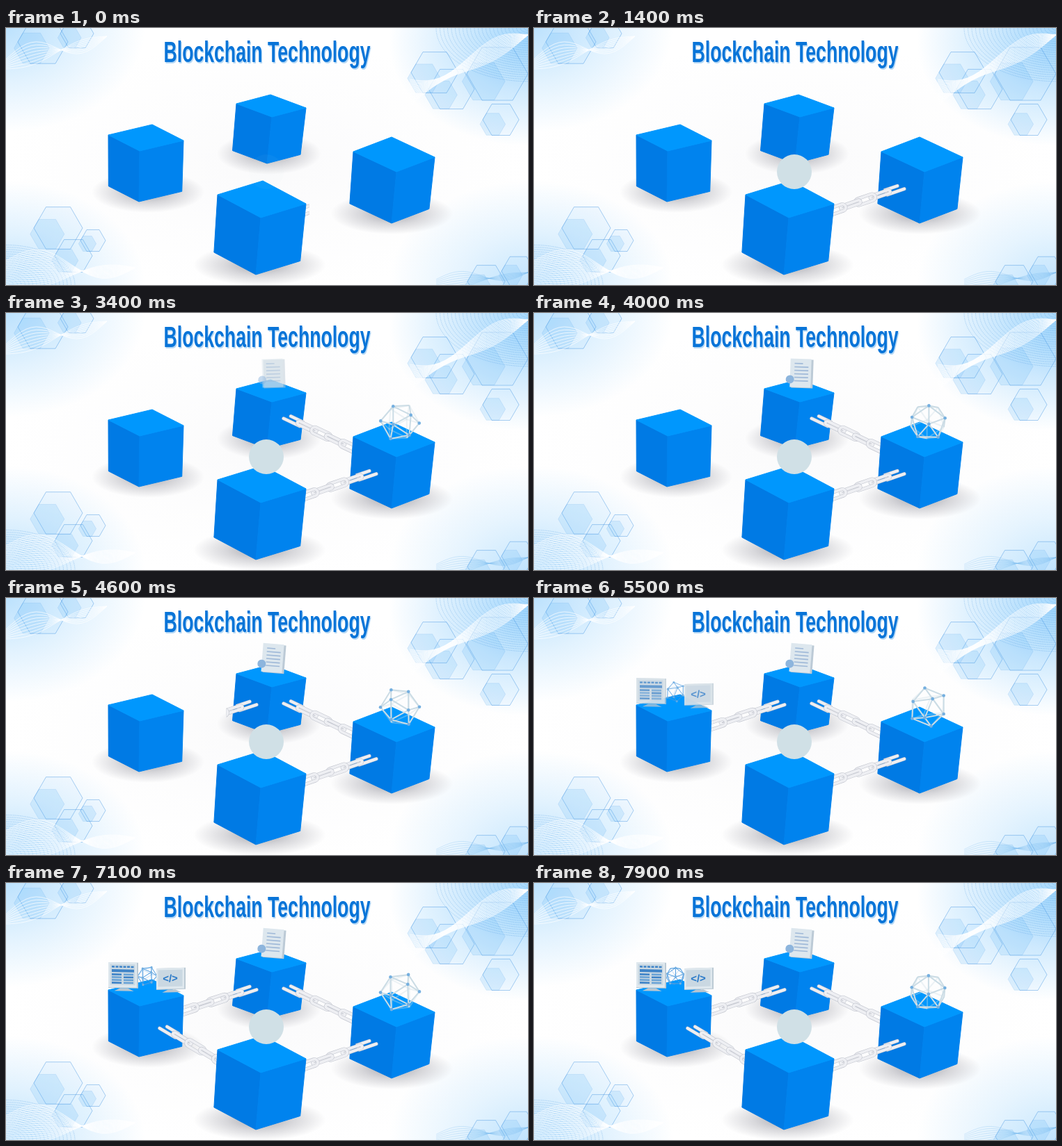
Recreate the animation shown at these times as an HTML page with a canvas. Size 750 px wide and 370 px high, loop 8 s.

```html
<!DOCTYPE html>
<html lang="en">
<head>
<meta charset="utf-8">
<title>Blockchain Technology</title>
<style>
html, body { margin: 0; width: 100%; height: 100%; overflow: hidden; background: #fff; }
canvas { display: block; }
</style>
</head>
<body>
<canvas id="stage" width="750" height="370"></canvas>
<script>
const W = 750, H = 370, LOOP = 8000, STEP = 100, TAU = Math.PI * 2;
const SANS = '"Liberation Sans", Arial, sans-serif';
const ctx = document.getElementById('stage').getContext('2d');
const backdrop = document.createElement('canvas');
backdrop.width = W;
backdrop.height = H;

const ramp = (t, start, length) => Math.min(1, Math.max(0, (t - start) / length));
const mix = (a, b, k) => a + (b - a) * k;
const add = (...points) => points.reduce(([ax, ay], [bx, by]) => [ax + bx, ay + by]);

function poly(c, points, fill, stroke, width = 1) {
  c.beginPath();
  points.forEach(p => c.lineTo(...p));
  c.closePath();
  if (fill) { c.fillStyle = fill; c.fill(); }
  if (stroke) { c.strokeStyle = stroke; c.lineWidth = width; c.stroke(); }
}

function disc(c, x, y, r, fill) {
  c.beginPath();
  c.arc(x, y, r, 0, TAU);
  c.fillStyle = fill;
  c.fill();
}

function glow(c, x, y, rx, ry, rgb, alpha) {
  c.save();
  c.translate(x, y);
  c.scale(rx, ry);
  const g = c.createRadialGradient(0, 0, 0, 0, 0, 1);
  g.addColorStop(0, `rgba(${rgb},${alpha})`);
  g.addColorStop(.5, `rgba(${rgb},${alpha * .45})`);
  g.addColorStop(1, `rgba(${rgb},0)`);
  c.fillStyle = g;
  c.fillRect(-1, -1, 2, 2);
  c.restore();
}

function hexagon(c, x, y, r, fillAlpha, lineAlpha) {
  const points = Array.from({ length: 6 }, (_, i) =>
    [x + r * Math.cos(i * TAU / 6), y + r * Math.sin(i * TAU / 6)]);
  poly(c, points, `rgba(105,185,245,${fillAlpha})`, `rgba(70,150,225,${lineAlpha})`);
}

// An outlined hexagon with a smaller tinted one overlapping its corner
function hexPair(c, x, y, r) {
  hexagon(c, x, y, r, .06, .45);
  hexagon(c, x - r * .45, y + r * .25, r * .7, .2, .15);
}

// Sine strands between two points that fan out in the middle
function wave(c, [x0, y0], [x1, y1], swing, count, color) {
  c.strokeStyle = color;
  c.lineWidth = .8;
  for (let i = 0; i < count; i++) {
    c.beginPath();
    for (let u = 0; u <= 1.01; u += .05) {
      c.lineTo(mix(x0, x1, u), mix(y0, y1, u) + i * 2 * (1 - u)
        + swing * Math.sin(u * TAU) * (1 - i / count * 1.6));
    }
    c.stroke();
  }
}

function ripples(c, x, y, count) {
  c.strokeStyle = 'rgba(65,145,220,.4)';
  c.lineWidth = .8;
  c.setLineDash([1.5, 1]);
  for (let i = 1; i <= count; i++) {
    c.beginPath();
    c.ellipse(x, y, i * 5.5, i * 3.2, 0, 0, TAU);
    c.stroke();
  }
  c.setLineDash([]);
}

function drawTitle(c) {
  c.save();
  c.translate(375, 48.5);
  c.scale(.634, 1);
  c.font = 'bold 42px ' + SANS;
  c.textAlign = 'center';
  c.fillStyle = '#b5d8f5';
  c.fillText('Blockchain Technology', 2, 2);
  c.fillStyle = '#0874d8';
  c.fillText('Blockchain Technology', 0, 0);
  c.restore();
}

// Each cube: front corner of its top, and the edges leaving that corner
const cubes = {
  left: { front: [192, 177], left: [-45, -23], right: [63, -15], down: [-1, 73] },
  back: { front: [382, 128], left: [-51, -19], right: [49, -13], down: [-7, 67] },
  right: { front: [561, 207], left: [-62, -29], right: [55, -21], down: [-7, 74] },
  front: { front: [366, 273], left: [-62, -33], right: [65, -20], down: [-7, 82] }
};

function drawShadow(c, { front, left, right, down }) {
  const [x, y] = add(front, down);
  const half = (right[0] - left[0]) / 2;
  glow(c, x + (left[0] + right[0]) / 2 + 4, y - 14, half * 1.5, 30, '80,80,95', .5);
}

function drawCube({ front, left, right, down }) {
  const l = add(front, left), r = add(front, right), low = add(front, down);
  // Lower edges are a little shorter: perspective
  const lowLeft = add(low, left.map(v => v * .97)), lowRight = add(low, right.map(v => v * .98));
  poly(ctx, [front, l, lowLeft, low], '#007ae4', '#007ae4');
  poly(ctx, [front, r, lowRight, low], '#0083ee', '#0083ee');
  poly(ctx, [front, l, add(l, right), r], '#0097fd', '#0097fd');
}

function drawBackdrop(c) {
  c.fillStyle = '#fff';
  c.fillRect(0, 0, W, H);
  glow(c, W / 2, 200, 380, 180, '246,246,248', .5);
  for (const [x, y, alpha] of [[0, 0, .42], [W, 20, .6], [0, H, .42], [W, H, .35]]) {
    glow(c, x, y, 200, 150, '95,185,250', alpha);
  }

  [[53, 20, 36], [102, 8, 24], [640, 88, 33], [616, 64, 34], [706, 66, 44],
   [711, 132, 26], [75, 288, 35], [97, 328, 27], [125, 306, 18],
   [690, 365, 27], [736, 350, 24]].forEach(h => hexPair(c, ...h));

  ripples(c, 0, H, 18);
  ripples(c, W, 0, 24);
  const white = 'rgba(255,255,255,.9)';
  wave(c, [0, 45], [145, 12], -16, 8, white);
  wave(c, [580, 74], [W, 10], 14, 20, white);
  wave(c, [0, 335], [186, 345], -18, 18, white);
  wave(c, [618, 362], [W, 352], -9, 8, 'rgba(100,175,235,.3)');

  Object.values(cubes).forEach(cube => drawShadow(c, cube));
  drawTitle(c);
}

// Links run from open prongs at one cube to the next cube; only lo..hi shows
function drawChain([x1, y1], [x2, y2], lo, hi) {
  if (hi <= lo) return;
  const up = x2 > x1 ? -1 : 1, gap = 3.7;
  ctx.save();
  ctx.beginPath();
  ctx.rect(lo, 0, hi - lo, H);
  ctx.clip();
  ctx.translate(x1, y1);
  ctx.rotate(Math.atan2(y2 - y1, x2 - x1));
  ctx.translate(0, up * gap);
  ctx.lineCap = 'round';
  for (let i = 0; i < 5; i++) {
    const x = i * 22.5, half = i % 2 ? 2.6 : 4.8;
    for (const [color, width] of [['#c3c6cf', 5], ['#eeeff3', 3.8]]) {
      ctx.beginPath();
      if (i) {
        ctx.roundRect(x, -half, 30, half * 2, half);
      } else {
        ctx.moveTo(2, -up * gap);
        ctx.lineTo(28, -up * gap);
        ctx.moveTo(10, up * gap);
        ctx.lineTo(28, up * gap);
        ctx.lineTo(28, -up * gap);
      }
      ctx.strokeStyle = color;
      ctx.lineWidth = width;
      ctx.stroke();
    }
  }
  ctx.restore();
}

// Icosahedron: cyclic turns of (0, ±1, ±golden ratio); edges have length 2
const GOLD = (1 + Math.sqrt(5)) / 2;
const corners = [];
for (const a of [-1, 1]) {
  for (const b of [-GOLD, GOLD]) corners.push([0, a, b], [a, b, 0], [b, 0, a]);
}
const edges = corners.flatMap((p, i) => corners.slice(i + 1)
  .map((q, j) => [i, i + 1 + j])
  .filter(([, k]) => Math.hypot(...p.map((v, n) => v - corners[k][n])) < 2.1));

function drawNetwork(x, y, radius, yaw, line, width, dot) {
  const tilt = .45, size = radius / Math.hypot(1, GOLD);
  const points = corners.map(([px, py, pz]) => {
    const rx = px * Math.cos(yaw) + pz * Math.sin(yaw);
    const rz = pz * Math.cos(yaw) - px * Math.sin(yaw);
    return [x + rx * size, y + (py * Math.cos(tilt) - rz * Math.sin(tilt)) * size,
            rz * Math.cos(tilt) + py * Math.sin(tilt)];
  });
  ctx.save();
  const shown = ctx.globalAlpha;
  ctx.strokeStyle = line;
  ctx.lineWidth = width;
  for (const [i, j] of edges) {
    // Far edges recede
    ctx.globalAlpha = shown * (points[i][2] + points[j][2] < -.3 ? .35 : 1);
    ctx.beginPath();
    ctx.moveTo(points[i][0], points[i][1]);
    ctx.lineTo(points[j][0], points[j][1]);
    ctx.stroke();
  }
  ctx.globalAlpha = shown;
  points.filter(p => p[2] > -.3).forEach(([px, py]) => disc(ctx, px, py, dot, '#74afe0'));
  ctx.restore();
}

function drawDocument(t) {
  ctx.save();
  ctx.globalAlpha = ramp(t, 2900, 1000);
  ctx.translate(384, 87);
  ctx.rotate(mix(-.03, .08, ramp(t, 3400, 1000)));
  ctx.fillStyle = '#bccad6';
  ctx.fillRect(-14, -20, 31, 41);
  ctx.fillStyle = '#dde7ee';
  ctx.fillRect(-16, -21, 30, 41);
  ctx.fillStyle = '#9fb9d8';
  for (let i = 0; i < 6; i++) ctx.fillRect(-10, -15 + i * 5, i ? 20 : 12, 1.6);
  disc(ctx, -16, 9, 6, '#8db5dd');
  ctx.restore();
}

function drawMonitor(x, y, w, h, slope, content) {
  ctx.save();
  ctx.transform(1, slope, 0, 1, x, y);
  poly(ctx, [[w * .4, h], [w * .65, h], [w * .85, h + 4], [w * .2, h + 4]], '#b9c6d0');
  ctx.fillStyle = '#bccad4';
  ctx.fillRect(0, 0, w, h);
  ctx.fillStyle = '#dfe8ee';
  ctx.fillRect(0, 0, w - 2, h - 1);
  ctx.fillStyle = '#cad8e2';
  ctx.fillRect(2.5, 2.5, w - 7, h - 7);
  content();
  ctx.restore();
}

function drawPage() {
  ctx.fillStyle = '#3f84c8';
  for (let i = 0; i < 6; i++) ctx.fillRect(5 + i * 5.5, 5, 4, 2.5);
  ctx.fillRect(5, 10, 32, 4);
  for (let i = 0; i < 8; i++) {
    ctx.fillStyle = i % 3 ? '#6aa3d6' : '#3f84c8';
    ctx.fillRect(i % 2 ? 22 : 5, 16 + (i >> 1) * 4, 14, 2.6);
  }
}

function drawCode() {
  ctx.fillStyle = '#2878c8';
  ctx.font = 'bold 15px ' + SANS;
  ctx.textAlign = 'center';
  ctx.fillText('</>', 20, 20);
}

function drawMonitors(t) {
  const shown = ramp(t, 4700, 1100);
  if (!shown) return;
  ctx.save();
  ctx.globalAlpha = shown;
  ctx.translate(0, 4 * (1 - shown));
  drawNetwork(203, 134, 14, t * .0008, '#4c9be0', 1, 1.6);
  drawMonitor(147, 114, 43, 37, .02, drawPage);
  drawMonitor(216, 123, 42, 31, -.03, drawCode);
  ctx.restore();
}

function draw(t) {
  ctx.drawImage(backdrop, 0, 0);
  drawCube(cubes.back);
  drawChain([362, 153], [256, 188], 364 - 109 * ramp(t, 4100, 1150), t > 4100 ? 364 : 0);
  drawChain([397, 151], [496, 198], 500 - 106 * ramp(t, 2000, 1100), 500);
  drawCube(cubes.left);
  drawCube(cubes.right);
  drawChain([534, 231], [430, 267], 425, 431 + 105 * ramp(t, -50, 1100));
  drawChain([219, 208], [304, 259], 215, 216 + 94 * ramp(t, 5850, 1350));
  drawCube(cubes.front);

  ctx.globalAlpha = mix(.04, 1, ramp(t, 0, 1000));
  disc(ctx, 374, 207, 25, '#d0e0e6');
  ctx.globalAlpha = ramp(t, 1700, 600);
  drawNetwork(566, 157, 28, t * .0008, '#cbdce5', 2, 2.3);
  ctx.globalAlpha = 1;
  drawDocument(t);
  drawMonitors(t);
}

function tick() {
  draw(Math.floor(performance.now() % LOOP / STEP) * STEP);
  requestAnimationFrame(tick);
}

drawBackdrop(backdrop.getContext('2d'));
tick();
</script>
</body>
</html>
```
